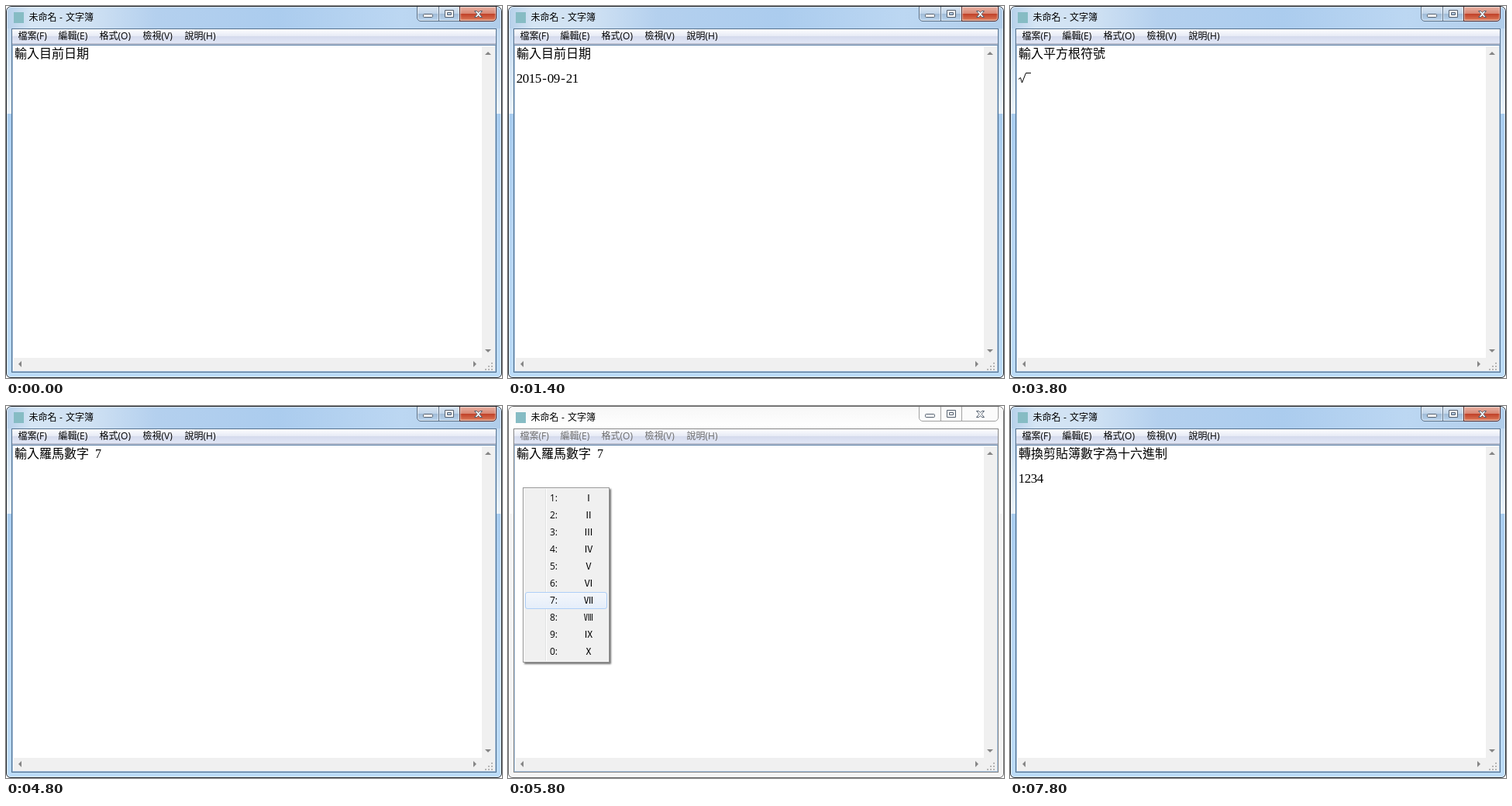
Write an HTML page that moves like this. It is 640 px wide and 480 px high and loops after 8 s.

```html
<!DOCTYPE html>
<html lang="zh-Hant">
<head>
<meta charset="utf-8">
<title>文字簿</title>
<style>
html, body { margin: 0; width: 100%; height: 100%; overflow: hidden; background: #fff; }
div { position: absolute; box-sizing: border-box; }
svg { position: absolute; left: 0; top: 0; }

.window {
  width: 640px; height: 480px; overflow: hidden;
  border: 1px solid #20262d; border-radius: 7px 7px 6px 6px;
  background: linear-gradient(#b8d3ee, #c3daf1 30px, #edf5fc 138px, #a9cdf0 138px, #b9d7f4 300px, #bcdcf8);
}
.caption {
  left: 0; top: 0; width: 638px; height: 28px;
  background: linear-gradient(90deg, #b5d0ea, #d5e5f4 5%, #cfe1f3 17%, #b4d0ee 30%, #abccee 55%, #bcd7f2 80%, #b0cdea);
}
.shine { inset: 0; border: 1px solid #ffffffa0; border-radius: 6px 6px 5px 5px; }
.client { left: 6px; top: 28px; width: 626px; height: 444px; border: 1px solid #55728f; background: #fff; }
.menubar {
  left: 0; top: 0; width: 624px; height: 20px;
  background: linear-gradient(#fdfdff, #e6eaf5 9px, #d4daec 9px, #e1e6f6 18px, #b7bdce 18px);
}
.edit { left: 0; top: 20px; width: 624px; height: 422px; border: 1px solid #a5c2df; border-top-color: #5b80a8; }
.bar { background: #f0f0f0; }
.button { top: -1px; height: 20px; border: 1px solid #5c7188; box-shadow: inset 0 0 0 1px #ffffff80; }
.blue { background: linear-gradient(#d9e6f3, #c0d4e9 48%, #9fbad6 48%, #b9d3ec); }
.red { border-color: #5a2a28; background: linear-gradient(#e9b3a5, #d98773 48%, #bd3d25 48%, #d5694b 85%, #e29a7a); }

.inactive .window { border-color: #656565; background: linear-gradient(#fcfcfc, #fff 138px, #f6f6f6 138px, #f4f4f4); }
.inactive .caption { background: linear-gradient(#f7f7f7, #fff); }
.inactive .client { border-color: #868686; }
.inactive .button { border-color: #a0a0a0; background: #fbfbfb; }
.inactive .menus { fill: #6d6d6d; }

.popup {
  left: 19px; top: 105px; width: 112px; height: 226px; display: none;
  border: 1px solid #979797; box-shadow: inset 0 0 0 1px #f8f8f8, 2px 2px 2px #0000008c;
  background: linear-gradient(90deg, #f0f0f0 28px, #e1e2e2 28px 29px, #fff 29px 30px, #f0f0f0 30px);
}
.choice {
  left: 2px; top: 134px; width: 106px; height: 22px;
  border: 1px solid #aecff7; border-radius: 3px;
  background: linear-gradient(#f3f6fb, #e5eefa);
}
.inactive .popup { display: block; }
#options { display: none; }
.inactive #options { display: inline; }

.ui { font: 12px "Open Sans", "Noto Sans CJK TC", "Noto Sans CJK", sans-serif; }
.document { font: 16px "Liberation Serif", "Noto Sans CJK TC", "Noto Sans CJK", serif; text-anchor: middle; }
#typed { font-size: 17px; }
</style>
</head>
<body>
<div class="window">
  <div class="caption"></div>
  <div class="shine"></div>
  <div class="button blue" style="left:529px;width:29px;border-radius:0 0 0 5px"></div>
  <div class="button blue" style="left:557px;width:28px"></div>
  <div class="button red" style="left:584px;width:48px;border-radius:0 0 5px 0"></div>
  <div class="client">
    <div class="menubar"></div>
    <div class="edit"></div>
    <div class="bar" style="left:606px;top:22px;width:17px;height:419px"></div>
    <div class="bar" style="left:2px;top:424px;width:621px;height:17px"></div>
  </div>
</div>
<div class="popup"><div class="choice"></div></div>

<svg width="640" height="480">
  <rect x="10" y="8" width="13" height="14" fill="#86bcc4"/>
  <g class="ui">
    <text x="29.5" y="19">未命名</text><text x="69" y="19">-</text><text x="77" y="19">文字簿</text>
    <g class="menus">
      <text x="15.5" y="43">檔案(F)</text>
      <text x="67.5" y="43">編輯(E)</text>
      <text x="120.5" y="43">格式(O)</text>
      <text x="176.5" y="43">檢視(V)</text>
      <text x="230.5" y="43">說明(H)</text>
    </g>
    <g id="options"></g>
  </g>

  <g fill="#fff" stroke="#535f6e">
    <rect x="538.5" y="10.5" width="12" height="4" rx="1"/>
    <path fill-rule="evenodd" d="M566.5 5.5h11v9h-11z M569.5 8.5h5v3h-5z"/>
    <path d="M604.5 6.5h3l2 2 2-2h3l-3.5 4 3.5 4h-3l-2-2-2 2h-3l3.5-4z"/>
  </g>

  <g fill="#858585">
    <path d="M618 63l4-4 4 4z M618 443l4 4 4-4z M20 458l-4 4 4 4z M603 458l4 4-4 4z"/>
    <path fill="#b5b5b5" d="M626 460h2v2h-2z M622 464h2v2h-2z M626 464h2v2h-2z M618 468h2v2h-2z M622 468h2v2h-2z M626 468h2v2h-2z"/>
  </g>

  <g class="document">
    <text id="heading" y="67"></text>
    <text id="typed" y="99"></text>
    <path id="root" d="M11 94.5L13.5 92.5L15.5 99L20.5 86.5H27" fill="none" stroke="#000"/>
  </g>
</svg>

<script>
const LOOP = 8000, KEY_DELAY = 200;
const scenes = [
  { start: 0, heading: "輸入目前日期", keys: "]]date", resultAt: 1400, result: "2015-09-21" },
  { start: 2400, heading: "輸入平方根符號", keys: ";;sqrt", resultAt: 3800, result: "√" },
  { start: 4800, heading: "輸入羅馬數字 7", keys: ";;ru", menuAt: 5800, resultAt: 6800, result: "Ⅶ" },
  { start: 7800, heading: "轉換剪貼簿數字為十六進制", keys: "", resultAt: 7800, result: "1234" },
];
const byId = id => document.getElementById(id);

byId("options").innerHTML = [..."ⅠⅡⅢⅣⅤⅥⅦⅧⅨⅩ"].map((numeral, i) => {
  const y = 123 + 22 * i;
  return `<text x="54" y="${y}">${(i + 1) % 10}:</text>
    <text x="104" y="${y}" text-anchor="middle">${numeral}</text>`;
}).join("");

// Half-width characters fill 8px cells, full-width ones 16px.
function setCells(element, text) {
  if (element.textContent === text) return;
  let left = 11;
  const centres = [...text].map(char => {
    const width = char.charCodeAt(0) > 255 ? 16 : 8;
    left += width;
    return left - width / 2;
  });
  element.setAttribute("x", centres.join(" "));
  element.textContent = text;
}

function draw() {
  const time = performance.now() % LOOP;
  const scene = scenes.findLast(({ start }) => time >= start);
  const done = time >= scene.resultAt;
  const menuOpen = !done && time >= scene.menuAt;
  const keyCount = Math.floor((time - scene.start) / KEY_DELAY);
  const typed = done ? scene.result : menuOpen ? "" : scene.keys.slice(0, keyCount);
  const isRoot = typed === "√";

  document.body.classList.toggle("inactive", menuOpen);
  setCells(byId("heading"), scene.heading);
  setCells(byId("typed"), isRoot ? "" : typed);
  byId("root").style.display = isRoot ? "inline" : "none";
  requestAnimationFrame(draw);
}
draw();
</script>
</body>
</html>
```
